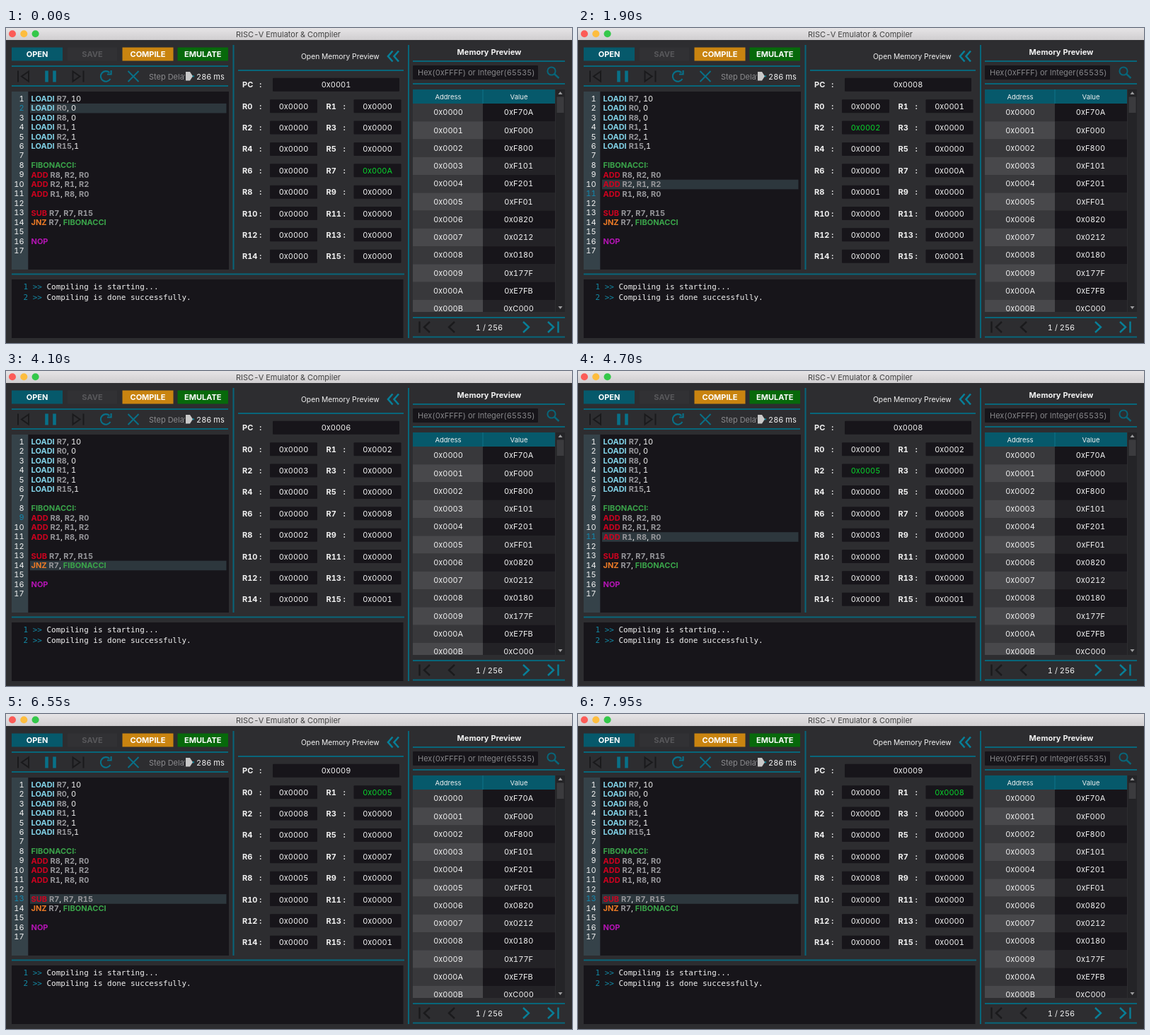
Write an HTML page that moves like this. It is 800x446 px and loops after 8 s.

```html
<!DOCTYPE html>
<html lang="en">
<head>
<meta charset="utf-8">
<title>Emulator</title>
<style>
html, body { margin: 0; width: 100%; height: 100%; overflow: hidden; background: #2d2d30; }
svg { display: block; width: 100%; height: 100%; }
text { font-family: Inter, "Open Sans", sans-serif; font-size: 11px; font-variant-numeric: tabular-nums; white-space: pre; }
.b { font-weight: 700; }
.small { font-size: 9.5px; }
.link { font-size: 10.3px; }
.mono { font-family: "DejaVu Sans Mono", monospace; font-size: 10.95px; }
</style>
</head>
<body>
<svg id="stage" viewBox="0 0 800 446">
  <defs>
    <linearGradient id="bar" x1="0" y1="0" x2="0" y2="1">
      <stop offset="0" stop-color="#e6e4e6"/>
      <stop offset="1" stop-color="#d0ced0"/>
    </linearGradient>
    <clipPath id="tableClip"><rect x="575" y="87" width="201" height="315"/></clipPath>
  </defs>
</svg>
<script>
const NS = "http://www.w3.org/2000/svg";
const stage = document.getElementById("stage");
const TEAL = "#08667a", DARK = "#17151a", WHITE = "#f2f2f2", OFF = "#1a1a1c", LIVE = "#08d52c";

function add(tag, attrs, parent = stage) {
  const el = document.createElementNS(NS, tag);
  for (const k in attrs) el.setAttribute(k, attrs[k]);
  parent.appendChild(el);
  return el;
}
const box = (x, y, x2, y2, fill, more = {}, parent) =>
  add("rect", { x, y, width: x2 - x, height: y2 - y, fill, ...more }, parent);
function label(x, y, str, fill = WHITE, more = {}, parent) {
  const el = add("text", { x, y, fill, ...more }, parent);
  el.textContent = str;
  return el;
}
const mid = (x, y, str, fill, more = {}, parent) =>
  label(x, y, str, fill, { "text-anchor": "middle", ...more }, parent);
const stroke = (d, color = TEAL, w = 2) =>
  add("path", { d, fill: "none", stroke: color, "stroke-width": w });
const hex = n => "0x" + n.toString(16).toUpperCase().padStart(4, "0");
const bold = { class: "b" };

// Window frame
box(0, 0, 800, 446, "#2d2d30");
box(0, 0, 800, 17, "url(#bar)");
["#fc5b57", "#fdbd3e", "#34c84a"].forEach((c, i) =>
  add("circle", { cx: 9 + 16.3 * i, cy: 8.2, r: 5, fill: c }));
mid(399, 12.7, "RISC-V Emulator & Compiler", "#434343");

// Buttons
[["OPEN", 8, 80, "#06596b", "#fff"], ["SAVE", 87, 157, "#313134", "#58585b"],
 ["COMPILE", 164.5, 236.5, "#c98410", "#fff"], ["EMULATE", 242.5, 314, "#07690b", "#fff"]]
.forEach(([name, x, x2, fill, ink]) => {
  box(x, 27.5, x2, 46.5, fill);
  mid((x + x2) / 2, 41, name, ink, bold);
});

// Dividers
stroke("M8 54H314M8 82H314M328 60H562M8 348.5H563M575 47H790M575 79H790M575 410H790M575 437.5H790M321.5 24V342M569 24V439");

// Toolbar
stroke("M17 60.5V76.5M32 61.5L22 68.5L32 75.5Z", OFF);
stroke("M57.5 60.5V76.5M68.5 60.5V76.5", "#087088", 4.6);
stroke("M109.5 60.5V76.5M94.5 61.5L104.5 68.5L94.5 75.5Z", OFF);
stroke("M147.5 72A7.3 7.3 0 1 1 146.3 63.2M148.6 60V65.5H143", "#087088", 2.1);
stroke("M172.5 61L187.5 76M187.5 61L172.5 76", "#087088", 2);
label(202, 72.6, "Step Delay", "#8b8b8e");
box(253, 60, 268, 77, "#2d2d30");
stroke("M259 68.3H266", "#0d8297");
add("path", { d: "M254 62H260L264 68.3L260 74.5H254Z", fill: "#c9c9c9" });
label(269, 72.6, "286 ms");

// Editor
box(8, 90, 315, 342, DARK);
box(8, 90, 31.3, 342, "#354249");
const rowBar = box(34, 0, 311.5, 13.6, "#2d373d");
const INK = { LOADI: "#82d3e8", ADD: "#d0021f", SUB: "#d0021f", JNZ: "#ec7a26", NOP: "#b314b3" };
const source = [
  "LOADI R7, 10", "LOADI R0, 0", "LOADI R8, 0", "LOADI R1, 1", "LOADI R2, 1", "LOADI R15,1", "",
  "FIBONACCI:", "ADD R8, R2, R0", "ADD R2, R1, R2", "ADD R1, R8, R0", "",
  "SUB R7, R7, R15", "JNZ R7, FIBONACCI", "", "NOP", ""];
const lineY = n => 104 + 13.48 * (n - 1);
const lineNums = source.map((str, i) => {
  const y = lineY(i + 1), line = add("text", { x: 35.5, y });
  for (const part of str.match(/[A-Z]+\d*:?|[^A-Z]+/g) || []) {
    const word = /^[A-Z]/.test(part);
    const fill = INK[part] || (/^FIB/.test(part) ? "#3aa44a" : word ? "#97979b" : WHITE);
    add("tspan", { fill, "font-weight": word ? 700 : 400 }, line).textContent = part;
  }
  return label(25.6, y - .4, i + 1, WHITE, { "text-anchor": "end" });
});

// Registers
label(417, 43.8, "Open Memory Preview", WHITE, { class: "link" });
stroke("M546.5 32.5L540 40L546.5 47.5M555 32.5L548.5 40L555 47.5", "#087f98", 2.6);
function field(name, x, y, x1, x2) {
  label(x, y + 4, name, WHITE, bold);
  label(x + 24.3, y + 4, ":", WHITE, bold);
  box(x1, y - 9.5, x2, y + 9.5, DARK, { rx: 1 });
  return mid((x1 + x2) / 2, y + 4, "");
}
const pcText = field("PC", 334, 80.3, 377, 556);
const regText = Array.from({ length: 16 }, (_, i) => {
  const dx = i % 2 ? 118.5 : 0;
  return field("R" + i, 334 + dx, 110.7 + 30.36 * (i >> 1), 373 + dx, 440 + dx);
});

// Console
box(8, 356, 561.5, 439, DARK);
["Compiling is starting...", "Compiling is done successfully."].forEach((msg, i) => {
  const y = 370 + 15 * i, mono = { class: "mono" };
  label(24.6, y, i + 1 + " >>", "#1389a5", mono);
  label(57.5, y, msg, WHITE, mono);
});

// Memory table
mid(683, 38, "Memory Preview", WHITE, bold);
box(575, 53, 752, 73, DARK, { rx: 1 });
label(582, 67, "Hex(0xFFFF) or Integer(65535)", "#87878a");
add("circle", { cx: 771, cy: 61, r: 5.6, fill: "none", stroke: TEAL, "stroke-width": 2 });
stroke("M775 65L781.5 71", TEAL, 2.4);
const table = add("g", { "clip-path": "url(#tableClip)" });
const memory = [0xF70A, 0xF000, 0xF800, 0xF101, 0xF201, 0xFF01, 0x0820, 0x0212, 0x0180, 0x177F, 0xE7FB, 0xC000];
memory.forEach((v, i) => {
  const y = 107 + 25.27 * i;
  box(575, y, 674, y + 25.3, i % 2 ? "#48484b" : "#38383b", {}, table);
  box(674, y, 776, y + 25.3, i % 2 ? "#232226" : DARK, {}, table);
  mid(625, y + 16.3, hex(i), WHITE, {}, table);
  mid(724.5, y + 16.3, hex(v), WHITE, {}, table);
});
box(575, 87, 776, 107, "#06596b");
box(673.5, 87, 674.5, 107, "#0f7589");
mid(625, 101, "Address", WHITE, { class: "small" });
mid(725, 101, "Value", WHITE, { class: "small" });
box(777, 87, 790, 402, "#242427");
box(778.5, 97.5, 788.5, 120, "#3b3b3e");
add("path", { d: "M780.5 94L783.5 90L786.5 94ZM780.5 394L783.5 398L786.5 394Z", fill: "#9a9a9c" });

// Pager
stroke("M584.5 415.5V431.5M599 416L591 423.5L599 431M634 416L626 423.5L634 431", OFF, 2.4);
stroke("M731 416L739 423.5L731 431M766 416L774 423.5L766 431M780.5 415.5V431.5", "#087f98", 2.4);
mid(683, 427.6, "1 / 256");

// Program: address -> editor line, and the register machine
const lineOf = pc => pc + (pc < 6 ? 1 : pc < 9 ? 3 : 4);
const LOADS = [[7, 10], [0, 0], [8, 0], [1, 1], [2, 1], [15, 1]];
const SUMS = [[8, 2, 0], [2, 1, 2], [1, 8, 0]];

function runProgram(steps) {
  const r = Array(16).fill(0);
  let pc = 0, prev = 0, hot = -1;
  while (steps-- > 0) {
    prev = pc++;
    hot = -1;
    if (prev < 6) {
      const [d, v] = LOADS[prev];
      r[hot = d] = v;
    } else if (prev < 9) {
      const [d, a, b] = SUMS[prev - 6];
      r[hot = d] = r[a] + r[b];
    } else if (prev === 9) {
      r[hot = 7] -= r[15];
    } else if (r[7]) {
      pc = 6;
    }
  }
  return { r, pc, prev, hot };
}

// Step clock with slight jitter; the row bar trails the registers
const LOOP = 8000, TICK = 50, LAG = 34;
const stepTime = s => 277 * s - 352 + 12 * Math.cos(Math.PI * s / 4);

function draw(ms) {
  const t = Math.floor((ms % LOOP) / TICK) * TICK;
  let s = 1;
  while (stepTime(s + 1) <= t) s++;
  const { r, pc, prev, hot } = runProgram(s);
  const now = lineOf(pc);
  const barLine = t < stepTime(s) + LAG ? lineOf(prev) : now;
  pcText.textContent = hex(pc);
  regText.forEach((el, i) => {
    el.textContent = hex(r[i]);
    el.setAttribute("fill", i === hot ? LIVE : WHITE);
  });
  lineNums.forEach((el, i) => el.setAttribute("fill", i + 1 === now ? "#1389b0" : WHITE));
  rowBar.setAttribute("y", lineY(barLine) - 10.6);
}

const start = performance.now();
function loop() {
  draw(performance.now() - start);
  requestAnimationFrame(loop);
}
loop();
</script>
</body>
</html>
```
